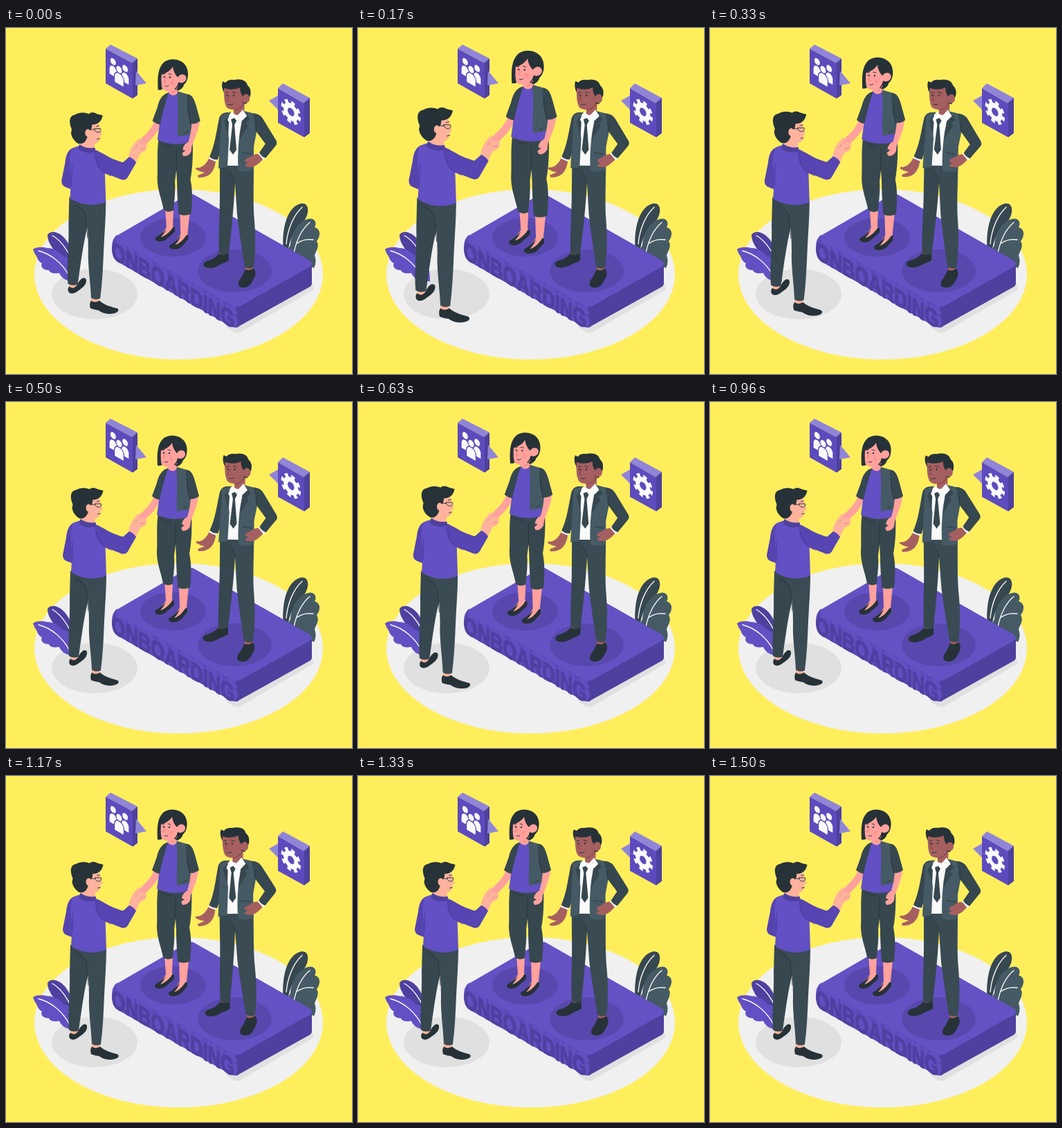
An HTML page that plays this animation: 500x500 px, repeating every 1.54 s.

```html
<!DOCTYPE html>
<html lang="en">
<head>
<meta charset="utf-8">
<title>Onboarding</title>
<style>
html, body { margin: 0; width: 100%; height: 100%; overflow: hidden; background: #ffee5c; }
svg { display: block; width: 100vw; height: 100vh; }
.ink { fill: #263238; }
.slate { fill: #37474f; }
.grey { fill: #455a64; }
.base { fill: #6250c4; }
.deep { fill: #4e409e; }
.light { fill: #9185d8; }
.pink { fill: #ffa19d; }
.peach { fill: #ffb29c; }
.brown { fill: #a65f60; }
.white { fill: #fafafa; }
.line { fill: none; stroke-linecap: round; stroke-linejoin: round; }
.vein { stroke: #fff; stroke-width: 1.3; }
.fold { stroke: #263238; stroke-width: .8; }
text { font: bold 35px "Liberation Sans", Arial, sans-serif; stroke-width: 1.8; stroke-linejoin: round; }
</style>
</head>
<body>
<svg viewBox="0 0 500 500" xmlns="http://www.w3.org/2000/svg">
  <rect width="500" height="500" fill="#ffee5c"/>
  <ellipse cx="249.5" cy="356" rx="208.5" ry="123" fill="#f0f0f0"/>
  <ellipse cx="128" cy="384.5" rx="62" ry="36.5" fill="#e0e0e0"/>

  <!-- plants -->
  <path class="deep" d="M98 348C80 334 60 316 60 299Q63 294 71 295C86 299 96 316 100 346Z"/>
  <path class="line vein" d="M67 300C78 306 87 318 94 333"/>
  <path class="base" d="M39 320C43 316 52 316 60 318C72 318 77 325 84 330C96 334 105 343 104 366L93 366C85 364 80 361 77 354C71 355 64 355 62 350C54 350 49 345 52 340C45 337 46 331 42 327Z"/>
  <path class="line vein" d="M47 322C64 326 82 340 91 358"/>
  <path class="slate" d="M401 322C398 296 404 260 425 254C438 251 439 266 432 277C422 289 410 299 408 322Z"/>
  <path class="line vein" d="M405 312C407 291 415 271 428 259"/>
  <path class="grey" d="M405 324L411 314C412 296 422 280 436 276C446 273 450 282 446 288C456 291 454 302 449 308C454 316 447 323 446 329C449 336 447 343 445 347Z"/>
  <path class="line vein" d="M416 325C420 306 428 290 439 281M421 311C428 306 437 305 444 306"/>

  <!-- platform -->
  <path fill="#e0e0e0" d="M318 432L328 439Q333 442 338 440L443 379Q446 376 443 372L440 355Z"/>
  <path fill="#5847b4" d="M160 299Q153 305 153 317Q153 332 160 337L324 431Q330 434 336 432L338 400Z"/>
  <path class="deep" d="M333 402Q329 418 333 433L439 374Q442 372 442 369V342Z"/>
  <path fill="#6452c5" d="M162 299L262 241Q267 238 272 241L439 336Q445 341 439 345L340 401Q333 405 326 401L162 308Q155 303 162 299Z"/>
  <g fill="#5848ae">
    <ellipse cx="241.5" cy="302.5" rx="47.5" ry="28"/>
    <ellipse cx="330.5" cy="351" rx="53.5" ry="31"/>
  </g>
  <g id="title"></g>

  <!-- signs -->
  <path class="light" d="M144 30L151 24L190 44L183 51Z"/>
  <path class="deep" d="M182 51L190 44V97L183 102Z"/>
  <path fill="#5d4bbd" d="M144 30L183 51V102L144 80Z"/>
  <path class="light" d="M188 62L203 80L187 83Z"/>
  <g transform="matrix(.866 .5 0 1 163.5 65)" class="white">
    <circle cx="-10" cy="-11.5" r="4.6"/><circle cx="10" cy="-11.5" r="4.6"/>
    <path d="M-16 9V1a6 6 0 0 1 12 0V9ZM4 9V1a6 6 0 0 1 12 0V9Z"/>
    <g stroke="#5d4bbd" stroke-width="1.5">
      <path d="M-8 17V8a8 8 0 0 1 16 0V17Z"/>
      <circle cy="-5" r="5.4"/>
    </g>
  </g>
  <path class="light" d="M394 97L380 105L394 119Z"/>
  <path class="light" d="M393 87L400 80L439 101L431 109Z"/>
  <path class="deep" d="M430 109L439 101V152L431 158Z"/>
  <path fill="#5d4bbd" d="M393 87L431 109V158L393 137Z"/>
  <g transform="matrix(.866 .5 0 1 411.8 121.3)" fill="none" stroke="#fafafa">
    <circle r="9" stroke-width="7"/>
    <circle r="14" stroke-width="5" stroke-dasharray="5.8 5.196"/>
  </g>

  <g id="pair">
    <!-- woman -->
    <path class="pink" d="M229 258L241 260L240 285L243 291L228 303L219 303L231 287ZM250 265L264 267L261 296L262 302L248 314L240 314L251 297Z"/>
    <path class="ink" d="M231 289Q224 297 216 301Q213 305 219 307Q228 308 233 302Q239 297 243 293L243 287Q239 286 239 289Q231 299 223 301Q228 296 231 289ZM251 299Q244 308 236 312Q233 316 239 318Q249 319 254 313L262 304L262 298Q259 297 258 300Q251 310 243 312Q249 306 251 299Z"/>
    <path class="slate" d="M220 160L268 164C269 181 268 204 265 219C268 233 268 249 266 268Q256 272 248 268C247 251 246 237 246 224L245 206L243 222C244 235 242 251 241 263Q233 267 227 262C224 246 218 234 218 217C219 196 217 180 220 160Z"/>
    <path class="line fold" d="M245 176L245 206M224 168Q230 174 238 172"/>
    <path class="pink" d="M215 134L224 138C221 149 212 160 203 168L197 177L189 170L196 160C204 153 211 145 215 134Z"/>
    <path class="pink" d="M234 84L248 82L249 98Q241 106 233 98Z"/>
    <path class="base" d="M229 98L234 96Q241 104 248 95L258 99L267 165Q242 174 218 163L222 135L222 115Z"/>
    <path class="slate" d="M234 96C224 98 220 108 218 117L211 136Q217 141 222 141Q226 121 234 96Z"/>
    <path class="grey" d="M247 94L261 98Q270 103 270 118L267 155L247 158C246 136 249 115 246 98Z"/>
    <path class="pink" d="M267 134L278 136C277 149 271 161 267 172L266 180Q262 187 255 186L253 182L258 178L254 177Q255 169 262 166C265 156 267 146 267 134Z"/>
    <path class="slate" d="M260 98C267 98 270 104 273 114L279 136Q273 141 265 140L261 123Z"/>
    <path class="line fold" d="M261 111L265 140M256 154L262 150"/>
    <path class="ink" d="M219 92C218 73 219 61 227 53C235 46 251 47 258 57C264 66 262 80 256 84Q254 91 247 93L235 86L223 92Z"/>
    <path class="pink" d="M224 70Q235 67 240 59Q241 68 247 74C250 69 257 68 259 74C260 80 253 84 248 81Q246 91 237 93Q229 95 225 90Q223 84 224 70Z"/>
    <path class="line" stroke="#e77d7c" d="M230 75L227.500 80L230 81M239 96Q244 94 247 88"/>
    <path class="line" stroke="#263238" stroke-width=".9" d="M226 70L229 69M234 69L238 70M229 86.500Q232 88 234 86"/>
    <g class="ink"><circle cx="228" cy="73.500" r="1.200"/><circle cx="236" cy="74" r="1.200"/></g>
    <circle cx="239" cy="82" r="3" fill="#f98787" opacity=".5"/>

    <!-- colleague at the left -->
    <g transform="translate(-1 0)">
      <path class="peach" d="M94 355L106 357L104 373L94 374ZM125 383L137 385L136 396L125 397Z"/>
      <path class="ink" d="M94 371Q100 376 105 369Q109 361 113 359Q119 358 118 364C117 371 109 375 104 379Q97 383 93 379Q91 374 94 371ZM125 391Q130 395 137 391C143 397 154 400 162 402Q166 405 161 408C151 412 141 409 136 405Q129 404 124 402Q122 395 125 391Z"/>
      <path class="slate" d="M94 244L125 250L120 286C114 309 111 333 106 368Q98 371 92 367C90 340 94 311 93 283Z"/>
      <path fill="#3a4b53" d="M105 249L146 250C146 272 144 294 143 317C142 341 141 365 138 388Q130 391 125 387C124 363 120 340 121 319C121 301 120 279 115 264Z"/>
      <path class="line fold" d="M102 256Q113 260 117 268L120 302"/>
    </g>
    <path fill="#5544ae" d="M99 174C90 177 88 187 87 196L82 221Q82 228 88 230L98 234L105 190Z"/>
    <path class="base" d="M97 175Q105 171 111 171L130 177Q140 180 143 190L145 251Q119 261 94 246L96 214Q91 187 97 175Z"/>
    <path class="line" stroke="#4a3ba0" stroke-width=".9" d="M97 197L96 228"/>
    <path class="peach" d="M177 190C178 177 184 168 192 161Q196 162 193 167L190 170L198 167Q204 168 203 173Q203 179 195 181Q191 186 187 197Z"/>
    <path class="line" stroke="#e88c80" d="M190 170L187 174M194 176L200 175"/>
    <path fill="#5645b2" d="M126 178C137 178 145 186 155 190L169 195L178 187Q184 189 188 195L176 216Q172 222 164 218L141 209Q128 200 128 178Z"/>
    <path class="line" stroke="#4a3ba0" stroke-width=".9" d="M131 187Q132 201 142 209L152 214M169 195L165 197"/>
    <g transform="translate(-1.500 -1)">
      <path class="peach" d="M110 158L131 160L130 177Q117 180 109 172Z"/>
      <path class="deep" d="M109 170Q118 177 131 175L132 181Q118 185 107 177Z"/>
      <path class="peach" d="M115 140L135 138Q138 145 138 150L141 156L138 158Q138 168 131 169Q121 170 114 163Z"/>
      <path class="ink" d="M98 149C93 137 95 129 103 128C110 124 117 125 122 127Q127 123 134 127L142 129Q141 135 137 139Q131 143 127 142L126 148L123 152L119 163Q115 171 107 169Q98 163 97 154Z"/>
      <ellipse class="peach" cx="121" cy="154" rx="4" ry="5.500"/>
      <path class="line" stroke="#263238" stroke-width=".9" d="M123 149L130 149.500M130 148L139 148Q140 152 137 153Q131 154 130 148M134 163L138 162M133 145L137 144"/>
    </g>
  </g>

  <g id="suit">
    <path class="brown" d="M309 318L322 321L321 334L308 334ZM346 340L358 342L358 356L346 356Z"/>
    <path class="ink" d="M308 326Q314 330 322 325L322 336Q316 340 311 341C304 346 294 349 287 345Q283 340 290 337Q302 334 308 326ZM346 349Q352 352 358 347Q362 352 360 359C357 364 355 371 349 374Q340 377 336 372Q335 366 340 361Z"/>
    <path class="slate" d="M309 194L339 200L331 224C329 262 326 292 322 326Q315 330 308 325C307 297 309 270 309 243Z"/>
    <path fill="#3a4b53" d="M322 200L358 200C358 231 357 256 359 278C361 302 361 325 358 346Q351 349 345 345C341 318 337 296 334 269L331 224Z"/>
    <path class="line fold" d="M322 208Q329 212 331 224"/>
    <path class="brown" d="M294 187L303 192C302 200 300 206 295 211Q288 217 278 216L277 213L287 209Q280 208 274 204Q274 201 279 202Q288 200 294 187Z"/>
    <path class="white" d="M295 184L306 189L303 193L293 189Z"/>
    <path class="white" d="M327 122L342 119L350 130L338 199H318L317 133Z"/>
    <path class="brown" d="M329 110L345 104L344 121Q338 129 329 124Z"/>
    <path class="slate" d="M325 132L330 130L333 134L330 140L333 176L328 183L323 176L327 140Z"/>
    <path class="slate" d="M322 122Q311 121 308 130C304 149 302 169 294 186Q299 191 306 190L315 162Z"/>
    <path class="grey" d="M325 121L319 135L322 160L320 201L307 203C308 180 310 155 311 126Z"/>
    <path class="grey" d="M344 120L360 124Q366 127 364 140L358 171L358 205Q347 210 336 206C334 190 336 163 338 149Z"/>
    <path class="slate" d="M344 120L353 132L347 137L350 141L337 162Q340 138 342 125ZM324 122L319 131L322 136L321 156L315 135Z"/>
    <path class="white" d="M327 121L329 127L324 133L322 126ZM342 118L348 127L341 134L332 129Z"/>
    <path class="brown" d="M364 182L372 189C366 195 362 200 354 201L346 200Q344 197 350 195L345 193Q345 189 352 187Q358 182 364 182Z"/>
    <path class="white" d="M364 181L368 179L376 187L372 191Z"/>
    <path class="slate" d="M357 123Q367 124 371 131L390 162Q393 167 389 171L375 188Q368 185 366 180L375 167L361 148Z"/>
    <path class="line fold" d="M361 137V148L375 167M341 180L354 182"/>
    <path class="ink" d="M315 94Q310 84 313 77L317 79Q321 74 329 75Q346 72 349 83Q355 88 353 98L347 110L337 107Z"/>
    <path class="brown" d="M315 87Q328 91 338 86Q338 94 342 99C345 93 352 95 352 102C352 108 346 110 342 107Q341 115 333 117Q325 120 319 115Q314 108 315 87Z"/>
    <path class="line" stroke="#7f4549" d="M322 97L319 104L322 105M330 119Q338 117 343 110"/>
    <path class="line" stroke="#263238" stroke-width=".9" d="M317 94L321 93M327 92.500L332 94M321 110.500Q324 112 328 110"/>
    <g class="ink"><circle cx="319.500" cy="97.500" r="1.200"/><circle cx="329" cy="97.500" r="1.200"/></g>
  </g>
</svg>
<script>
const LOOP = 1540, STEPS = 37, LEAD = 0.018;
const $ = id => document.getElementById(id);

// Raised lettering: stacked layers along the depth axis, face last.
function raise(word, depth) {
  let out = '';
  for (let i = 0; i <= depth; i++) {
    const col = i < depth ? '#6250c2' : '#5040a2';
    const x = 158 - i * 0.87, y = 329 + i * 0.5;
    const extra = i < depth ? ' aria-hidden="true"' : '';
    out += `<text transform="matrix(.73 .424 0 1 ${x} ${y})" fill="${col}" stroke="${col}"${extra}>${word}</text>`;
  }
  return out;
}

// Linear interpolation over [position, value] stops.
function track(stops, p) {
  const i = stops.findIndex(s => s[0] > p);
  const [a, u] = stops[i - 1], [b, v] = stops[i];
  return u + (v - u) * (p - a) / (b - a);
}

const beat = [[0, 1], [.1, 1.1], [.3, 1], [.4, 1], [.5, 1.1], [.6, 1], [1, 1]];
const sway = [[0, 0], [.25, 1], [.75, -1], [1, 0]];

function draw(now) {
  const step = Math.min(STEPS - 1, Math.floor((now % LOOP + 6) / LOOP * STEPS));
  const p = (step / STEPS + LEAD) % 1;
  $('pair').setAttribute('transform', `translate(181 229) scale(${track(beat, p)}) translate(-181 -229)`);
  $('suit').setAttribute('transform', `rotate(${track(sway, p)} 333 225)`);
}

function tick() {
  draw(performance.now());
  requestAnimationFrame(tick);
}

$('title').innerHTML = raise('ONBOARDING', 6);
tick();
</script>
</body>
</html>
```
